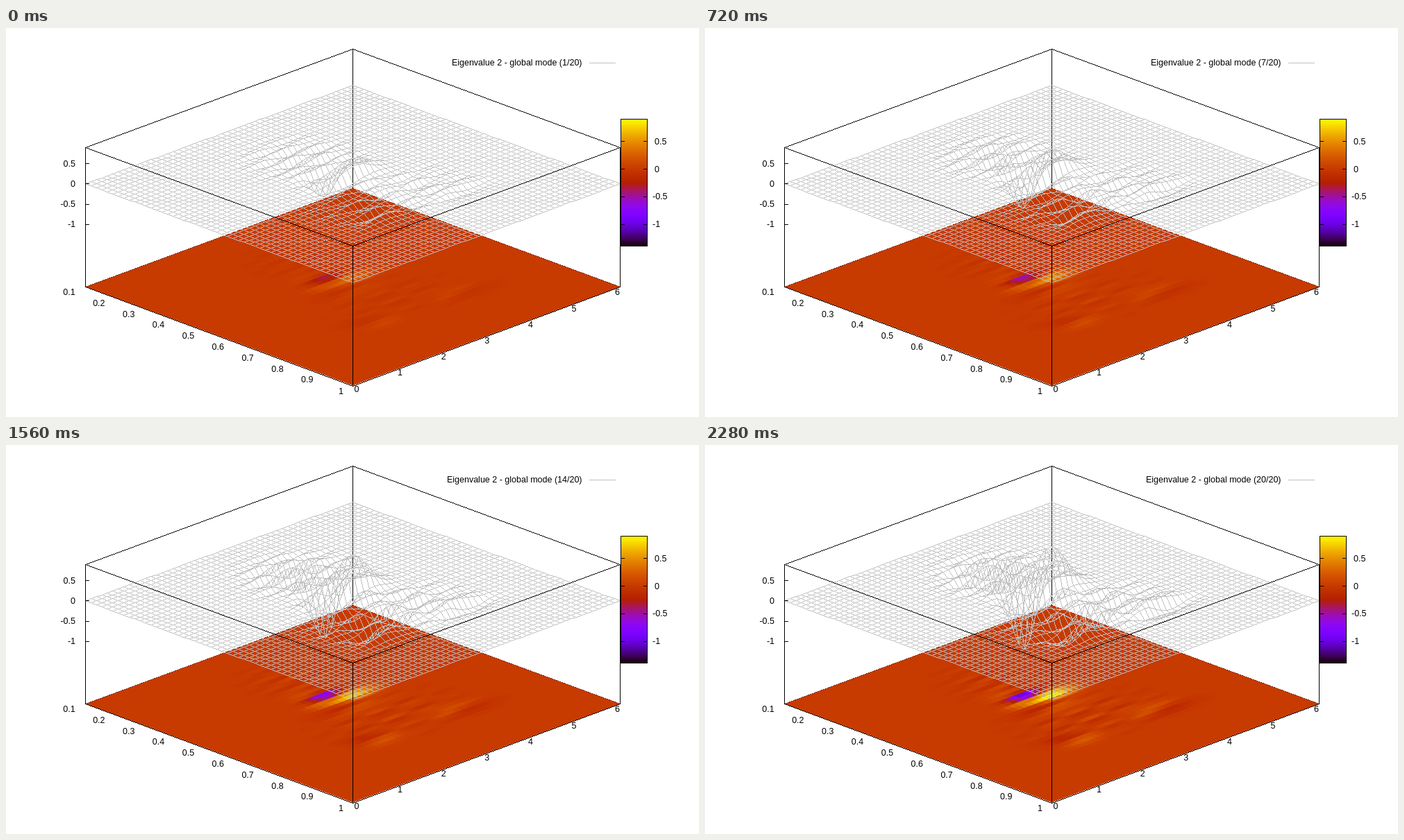
Write an HTML page with a canvas that moves like this. It is 998 px wide and 561 px high and loops after 2.4 s.

```html
<!DOCTYPE html>
<html lang="en">
<head>
<meta charset="utf-8">
<title>Eigenvalue mode</title>
<style>
html, body { margin: 0; width: 100%; height: 100%; overflow: hidden; background: #fff; }
canvas { display: block; }
</style>
</head>
<body>
<canvas id="stage" width="998" height="561"></canvas>
<script>
const ctx = document.getElementById('stage').getContext('2d');
const N = 49, STEPS = 20, STEP_MS = 120;
const Z_MIN = -1.4, Z_MAX = 0.9, Z_SCALE = 58.4;
const TOP = 171.75, MID = 224.3, FLOOR = 373.3;

// Screen position of (u, v) in a plane whose left corner is at height y.
const project = (u, v, y) => [114 + 385 * (u + v), y + 142.2 * (u - v)];
const bell = (d, s) => Math.exp(-d * d / (2 * s * s));
const wave = (d, length) => Math.cos(2 * Math.PI * d / length);

// Peaks of the mode: u, v, height, spread in u, spread in v
const peaks = [
  [.408, .49, -1.5, .015, .04],
  [.452, .54, 1.15, .021, .058],
  [.44, .44, .4, .015, .035],
  [.367, .455, .3, .013, .04],
  [.495, .47, -.35, .015, .06],
  [.53, .5, .3, .015, .05],
  [.742, .376, .28, .018, .045],
  [.697, .343, -.25, .016, .04],
  [.718, .63, .2, .016, .04],
  [.746, .69, -.22, .016, .06],
  [.706, .69, .16, .014, .05]
];

function mode(u, v) {
  let z = 0;
  for (const [pu, pv, h, su, sv] of peaks) z += h * bell(u - pu, su) * bell(v - pv, sv);
  z += .38 * wave(u - .367 + .15 * (v - .5), .053) * bell(u - .28, .08) * bell(v - .53, .08);
  z += .34 * wave(u - .728, .059) * wave(v - .39, .23) * bell(u - .63, .075) * bell(v - .51, .13);
  return z;
}

const shape = Array.from({ length: N + 1 }, (_, i) =>
  Array.from({ length: N + 1 }, (_, j) => mode(i / N, j / N)));

function heat(z) {
  const g = Math.min(1, Math.max(0, (z - Z_MIN) / (Z_MAX - Z_MIN)));
  const rgb = [Math.sqrt(g), g ** 3, Math.max(0, Math.sin(2 * Math.PI * g))];
  return `rgb(${rgb.map(c => Math.round(255 * c))})`;
}

// Line of whole pixels, without smoothing
function line([x0, y0], [x1, y1]) {
  x0 = Math.round(x0); y0 = Math.round(y0);
  const dx = Math.round(x1) - x0, dy = Math.round(y1) - y0;
  const n = Math.max(Math.abs(dx), Math.abs(dy), 1);
  for (let i = 0; i <= n; i++)
    ctx.fillRect(Math.round(x0 + dx * i / n), Math.round(y0 + dy * i / n), 1, 1);
}

function polygon(points) {
  ctx.beginPath();
  for (const [x, y] of points) ctx.lineTo(x + .5, y);
  ctx.closePath();
  ctx.fill();
}

function text(s, x, y, align) {
  ctx.textAlign = align;
  ctx.fillText(s, x, y + 4.5);
}

const corners = y => [[0, 0], [1, 0], [1, 1], [0, 1]].map(([u, v]) => project(u, v, y));
const [topL, topF, topR, topB] = corners(TOP);
const [lowL, lowF, lowR, lowB] = corners(FLOOR);

function drawFloor(amp) {
  ctx.fillStyle = heat(0);
  polygon([lowL, lowF, lowR, lowB]);
  for (let i = 0; i < N; i++) for (let j = 0; j < N; j++) {
    const z = amp * (shape[i][j] + shape[i + 1][j] + shape[i][j + 1] + shape[i + 1][j + 1]) / 4;
    if (Math.abs(z) < .006) continue;
    ctx.fillStyle = heat(z);
    polygon([[i, j], [i + 1.05, j], [i + 1.05, j + 1.05], [i, j + 1.05]]
      .map(([a, b]) => project(a / N, b / N, FLOOR)));
  }
}

function drawMesh(amp) {
  const node = (i, j) => project(i / N, j / N, MID - Z_SCALE * amp * shape[i][j]);
  ctx.fillStyle = '#c0c0c0';
  for (let i = 0; i <= N; i++) for (let j = 0; j < N; j++) {
    line(node(i, j), node(i, j + 1));
    line(node(j, i), node(j + 1, i));
  }
}

function drawColorBar() {
  const x = 885, y = 131, w = 38, h = 183;
  for (let r = 0; r < h; r++) {
    ctx.fillStyle = heat(Z_MAX - (Z_MAX - Z_MIN) * r / h);
    ctx.fillRect(x, y + r, w, 1);
  }
  ctx.fillStyle = '#000';
  line([x, y], [x + w, y]);
  line([x, y + h], [x + w, y + h]);
  line([x, y], [x, y + h]);
  line([x + w, y], [x + w, y + h]);
}

function drawLabels(k) {
  ctx.font = '12.5px "Liberation Sans", Arial, sans-serif';
  ctx.fillStyle = '#000';
  for (const z of [.5, 0, -.5, -1]) {
    const y = MID - Z_SCALE * z, barY = 203 - 79.6 * z;
    line([114, y], [119, y]);
    text(z, 100, y, 'right');
    line([885, barY], [890, barY]);
    line([918, barY], [923, barY]);
    text(z, z < 0 ? 931 : 934, barY, 'left');
  }
  for (let i = 0; i < 9; i++) text((i + 1) / 10, 91 + 42.85 * i, 380.5 + 15.8 * i, 'center');
  text(1, 482.5, 523, 'center');
  for (let i = 0; i <= 6; i++) text(i, 505 + 62.6 * i, 520 - 23.2 * i, 'center');
  text(`Eigenvalue 2 - global mode (${k}/${STEPS})`, 829.5, 49.5, 'right');
  ctx.fillStyle = '#c0c0c0';
  line([840, 50], [877, 50]);
}

function draw(k) {
  const amp = .36 + .64 * (k - 1) / (STEPS - 1);
  ctx.fillStyle = '#fff';
  ctx.fillRect(0, 0, 998, 561);

  ctx.fillStyle = '#000';
  for (const [a, b] of [[topB, lowB], [topL, topB], [topB, topR], [lowL, lowB], [lowB, lowR]]) line(a, b);
  drawFloor(amp);
  drawMesh(amp);
  ctx.fillStyle = '#000';
  for (const [a, b] of [[topL, lowL], [topR, lowR], [topF, lowF], [topL, topF], [topF, topR],
    [lowL, lowF], [lowF, lowR]]) line(a, b);

  drawColorBar();
  drawLabels(k);
}

let shown = 0;
const start = performance.now();
function tick() {
  const k = Math.floor((performance.now() - start) / STEP_MS) % STEPS + 1;
  if (k !== shown) draw(shown = k);
  requestAnimationFrame(tick);
}
tick();
</script>
</body>
</html>
```
